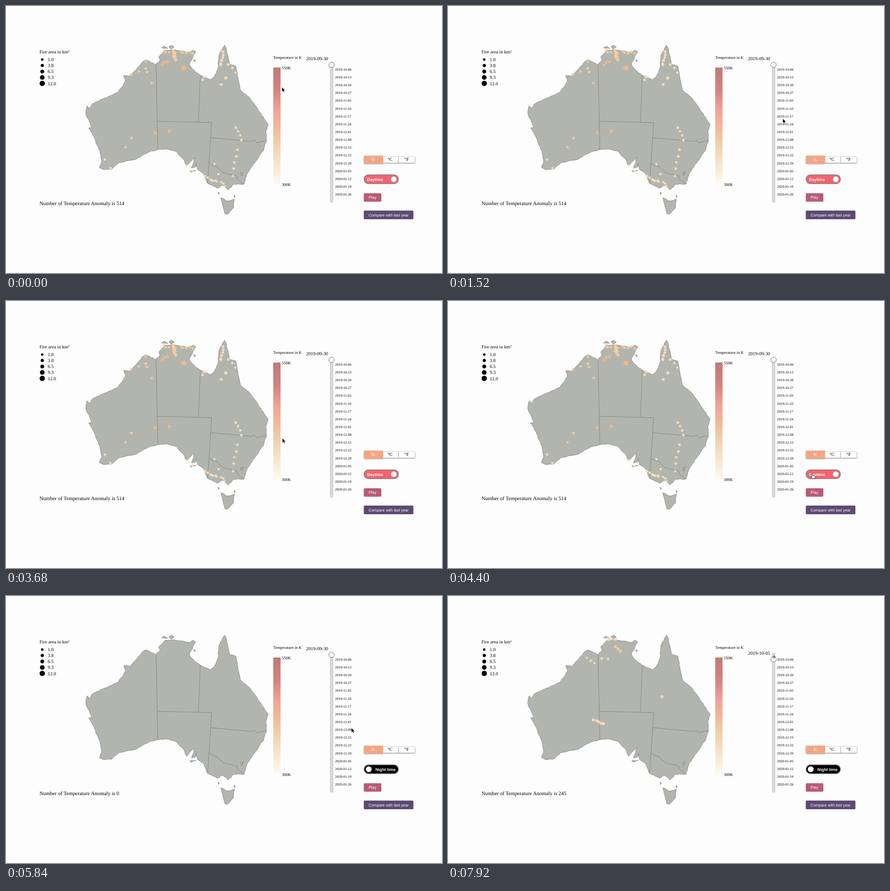
An HTML page that plays this animation: 956 px wide and 586 px high, repeating every 8000 ms.

```html
<!DOCTYPE html>
<html lang="en">
<head>
<meta charset="utf-8">
<title>Fire map</title>
<style>
  html, body { margin: 0; width: 100%; height: 100%; overflow: hidden; background: #fdfdfd; }
  svg { display: block; width: 100vw; height: 100vh; }
  text { font-family: "Liberation Serif", "Times New Roman", serif; text-rendering: geometricPrecision; }
  .sans { font-family: "Liberation Sans", Arial, sans-serif; fill: #fff; }
  #land path { fill: #b2b5ae; stroke: #777973; stroke-width: .8; stroke-linejoin: round; }
  #land .border { fill: none; }
</style>
</head>
<body>
<svg viewBox="0 0 956 586">
  <defs>
    <linearGradient id="heat" x1="0" y1="0" x2="0" y2="1">
      <stop offset="0" stop-color="#bf7b76"/>
      <stop offset=".2" stop-color="#d58380"/>
      <stop offset=".36" stop-color="#f3a197"/>
      <stop offset=".5" stop-color="#f3b698"/>
      <stop offset=".63" stop-color="#efcda9"/>
      <stop offset=".8" stop-color="#f5e2c8"/>
      <stop offset="1" stop-color="#fdfaef"/>
    </linearGradient>
    <clipPath id="pill"><rect x="785" y="370.5" width="75.5" height="19.5" rx="9.75"/></clipPath>
    <filter id="shade" x="-10%" y="-20%" width="120%" height="160%">
      <feDropShadow dx="0" dy="1" stdDeviation=".8" flood-opacity=".55"/>
    </filter>
  </defs>
  <rect width="956" height="586" fill="#fdfdfd"/>
  <g id="land"></g>
  <g id="day"></g>
  <g id="night"></g>

  <text x="73.5" y="103.5" font-size="10.3">Fire area in km²</text>
  <g id="sizes" font-size="10.4"></g>
  <text id="count" x="73.5" y="437" font-size="11.47"></text>

  <text x="586" y="116.2" font-size="8.85">Temperature in K</text>
  <rect x="586" y="135" width="16" height="256" fill="url(#heat)"/>
  <text x="604.8" y="138.8" font-size="9">550K</text>
  <text x="604.8" y="395" font-size="9">300K</text>

  <rect x="711.2" y="125" width="5.6" height="306" rx="2.8" fill="#d9d9d9" stroke="#b0b0b0" stroke-width=".8"/>
  <g id="ticks" font-size="7.7"></g>
  <g id="handle">
    <circle cx="713.8" cy="129" r="5.9" fill="#fff" stroke="#666"/>
    <text id="date" x="658" y="119" font-size="10.35"></text>
  </g>

  <g filter="url(#shade)">
    <rect x="785" y="330.5" width="111.5" height="13.5" rx="1" fill="#fff" stroke="#bbb" stroke-width=".5"/>
    <rect x="785" y="328.5" width="42" height="17" rx="1.5" fill="#f4a582"/>
  </g>
  <path d="M860.5 331V344" stroke="#888" stroke-width=".8"/>
  <g font-size="10.5" text-anchor="middle">
    <text x="805.5" y="340.3" fill="#fff">K</text>
    <text x="842" y="340.3">°C</text>
    <text x="878.5" y="340.3">°F</text>
  </g>

  <g clip-path="url(#pill)">
    <g id="panel" font-size="9" font-weight="bold">
      <rect x="784" y="370" width="77" height="21" fill="#f1636d"/>
      <rect x="861" y="370" width="78" height="21" fill="#000"/>
      <text class="sans" x="791.8" y="383.5">Daytime</text>
      <text class="sans" x="886" y="383.5">Night time</text>
    </g>
  </g>
  <rect x="785" y="370.5" width="75.5" height="19.5" rx="9.75" fill="none" stroke="#87807f" stroke-width="1.6"/>
  <circle id="knob" cy="380.2" r="6.3" fill="#fff" stroke="#aaa" stroke-width=".8"/>

  <rect x="784.5" y="411" width="38.5" height="18.5" rx="2" fill="#b85c76"/>
  <text class="sans" x="795" y="423.4" font-size="8.75">Play</text>
  <rect x="784.5" y="449" width="108.8" height="19" rx="2" fill="#5c4a72"/>
  <text class="sans" x="795" y="461.8" font-size="8.6">Compare with last year</text>

  <g id="cursor">
    <path id="arrow" d="M0 0V10.2L2.3 8.1 4 11.8 5.6 11.1 4 7.5H7.2Z" stroke="#fff" stroke-width=".6"/>
    <path id="hand" d="M0 1Q.8-.6 1.8 1L3 4 6.6 4.4Q8 4.8 8 6.3L7.3 11H2.6L-.9 7.2Q-1 5.8 1 6.3Z" fill="#fff" stroke="#222" stroke-width=".9"/>
    <path id="cross" d="M-4 0H4M0-4V4" stroke="#333"/>
  </g>
</svg>
<script>
const $ = id => document.getElementById(id);
const NS = "http://www.w3.org/2000/svg";
function add(parent, tag, attrs, text) {
  const el = document.createElementNS(NS, tag);
  for (const k in attrs) el.setAttribute(k, attrs[k]);
  if (text) el.textContent = text;
  $(parent).append(el);
}

let seed = 7;
function noise() { // -1 to 1
  seed = seed * 16807 % 2147483647;
  return seed / 1073741823.5 - 1;
}

// Joins key points with a line that wobbles like a shore or a river.
function rough(points, wobble) {
  const p = points.split(" ").map(s => s.split(",").map(Number));
  let d = "M" + p[0];
  for (let i = 1; i < p.length; i++) {
    const [x0, y0] = p[i - 1], [x1, y1] = p[i];
    const len = Math.hypot(x1 - x0, y1 - y0), n = Math.ceil(len / 5);
    for (let k = 1; k < n; k++) {
      const off = noise() * wobble / len;
      d += `L${x0 + (x1 - x0) * k / n - (y1 - y0) * off} ${y0 + (y1 - y0) * k / n + (x1 - x0) * off}`;
    }
    d += "L" + p[i];
  }
  return d;
}
const shore = points => add("land", "path", { d: rough(points, .9) + "Z" });
const border = (points, wobble) => add("land", "path", { class: "border", d: rough(points, wobble) });

const coast = {
  north: "329,129 338,118 335,112 349,97 368,96 404,102 410,97 416,100 402,128 408,137 426,152 448,162 457,155 465,135 467,108 479,86",
  east: "483,93 490,128 504,132 514,184 533,200 551,224 569,252 575,261 570,274 571,295 565,317 541,349 528,370 522,391",
  south: "499,391 487,404 476,393 463,400 442,389 434,369 420,359 417,345 415,354 407,356 414,333 396,352 390,338 372,319 353,314 333,315 311,322 283,337 247,344 232,358 213,359",
  west: "205,355 210,342 206,319 190,283 181,268 188,267 175,236 178,219 182,226 188,216 212,204 246,189 262,165 258,153 273,154 297,125 306,118 318,124 329,129"
};
shore(Object.values(coast).join(" "));
shore("471,421 486,428 501,424 499,443 486,457 480,456");
for (const isle of ["341,92 347,88 355,93", "357,89 364,86 369,90 362,95", "411,118 415,119 414,123",
  "403,361 417,361 406,365", "465,408 468,411 466,414", "500,415 503,418 501,421"]) shore(isle);
border("329,129 333,315", 0);
border("426,152 422,254", 0);
border("332,253 451,256 442,389", 0);
border("449,289 526,296", 0);
border("526,296 538,297 545,294 549,300 571,295", .6);
border("445,345 463,353 476,366 506,373 507,380", 1);
border("507,380 522,391", 0);
border("514,367 520,364 517,373 514,367", 0);

// Scatters n fires along the line from one place to another.
function fires(layer, fill, x0, y0, x1, y1, n, spread = 0, r = 2.8) {
  for (let i = 0; i < n; i++) {
    const k = n > 1 ? i / (n - 1) : 0;
    add(layer, "circle", {
      cx: x0 + (x1 - x0) * k + noise() * spread,
      cy: y0 + (y1 - y0) * k + noise() * spread,
      r: r + noise() * .3, fill, "fill-opacity": .9
    });
  }
}
const pale = "#fbdfbd", warm = "#f6cb9f", deep = "#f0b989", dim = "#f3dcbd";
fires("day", warm, 346, 99, 411, 101, 10, 3.5);
fires("day", warm, 366, 98, 371, 118, 9, 2, 3.3);
fires("day", deep, 340, 127, 354, 121, 3, 3, 3.2);
fires("day", deep, 389, 136, 391, 136, 2, 0, 5.2);
fires("day", warm, 274, 150, 306, 137, 3, 1);
fires("day", warm, 306, 124, 317, 168, 3, 3);
fires("day", deep, 327, 278, 358, 275, 2, 0, 3.7);
fires("day", warm, 275, 290, 262, 310, 2);
fires("day", pale, 217, 337, 229, 356, 2);
fires("day", pale, 477, 100, 469, 131, 6, 2, 3);
fires("day", pale, 488, 127, 503, 145, 3, 2);
fires("day", pale, 482, 158, 472, 172, 2, 0, 3.4);
fires("day", pale, 435, 155, 431, 162, 2, 0, 3.3);
fires("day", pale, 503, 265, 518, 293, 4, 2);
fires("day", pale, 506, 316, 497, 372, 5, 1.5);
fires("day", pale, 466, 369, 457, 347, 2);
fires("day", pale, 437, 374, 481, 394, 9, 3);
fires("day", pale, 396, 350, 408, 361, 2);
fires("night", dim, 349, 94, 370, 94, 5, 2.5, 3);
fires("night", warm, 367, 111, 378, 121, 3, 0, 3.3);
fires("night", dim, 337, 137, 351, 138, 2, 0, 3.1);
fires("night", dim, 304, 136, 321, 148, 3, 1);
fires("night", dim, 319, 271, 341, 281, 5, 1, 3.5);
fires("night", dim, 469, 221, 469, 221, 1, 0, 3.4);

["1.0", "3.8", "6.5", "9.3", "12.0"].forEach((label, i) => {
  const y = 117.5 + i * 13.1;
  add("sizes", "circle", { cx: 79.5, cy: y, r: 2.7 + i * .8 });
  add("sizes", "text", { x: 91.5, y: y + 3.6 }, label);
});

const dayText = n => new Date(Date.UTC(2019, 8, 30 + n)).toISOString().slice(0, 10);
for (let i = 0; i < 17; i++) add("ticks", "text", { x: 721.6, y: 141.7 + i * 17.16 }, dayText(6 + i * 7));

// Pointer stops: time, x, y
const stops = [
  [0, 605, 178], [720, 635, 240], [1520, 734, 247], [2240, 797, 297], [2960, 510, 281], [3680, 606, 301],
  [4320, 797, 379], [5200, 797, 379], [5360, 799, 385], [6160, 735, 238], [6560, 712.5, 140],
  [7120, 714, 128], [7680, 715, 134], [8000, 715, 134]
];
const LOOP = 8000, CLICK = 5310, DRAG = 7360, DROP = 7680;
const clamp = v => Math.max(0, Math.min(1, v));
const ease = v => v * v * (3 - 2 * v);
const show = (id, on) => $(id).setAttribute("visibility", on ? "visible" : "hidden");
const move = (id, x, y) => $(id).setAttribute("transform", `translate(${x} ${y})`);

function pointer(t) {
  const i = stops.findIndex(s => s[0] > t);
  const [t0, x0, y0] = stops[i - 1], [t1, x1, y1] = stops[i];
  const k = ease((t - t0) / (t1 - t0));
  return [x0 + (x1 - x0) * k, y0 + (y1 - y0) * k];
}

function draw(t) {
  const flip = ease(clamp((t - CLICK) / 300));
  move("panel", -76 * flip, 0);
  $("knob").setAttribute("cx", 850.3 - 55 * flip);

  const days = Math.round(ease(clamp((t - DRAG) / (DROP - DRAG))) * 5);
  move("handle", 0, days * 2);
  $("date").textContent = dayText(days);

  show("day", t < CLICK);
  show("night", days > 0);
  const total = t < CLICK ? 514 : days ? 245 : 0;
  $("count").textContent = "Number of Temperature Anomaly is " + total;

  const [x, y] = pointer(t);
  move("cursor", x, y);
  const hand = t > 4200 && t < 5600, cross = t > 6440;
  show("hand", hand);
  show("cross", cross);
  show("arrow", !hand && !cross);
}

function tick() {
  draw(performance.now() % LOOP);
  requestAnimationFrame(tick);
}
tick();
</script>
</body>
</html>
```
